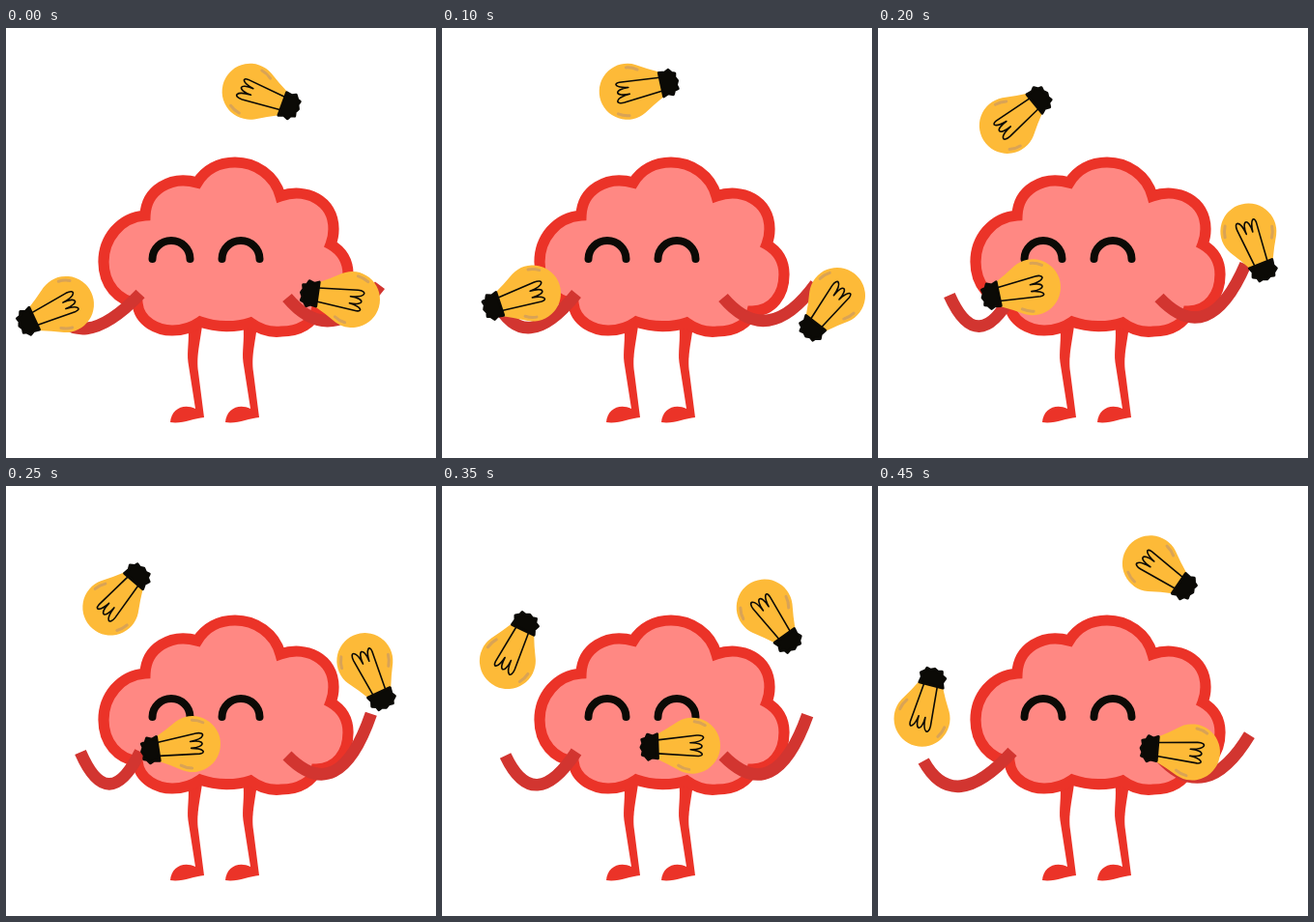
Recreate the animation shown at these times as an HTML page. Size 445 by 445 pixels, loop 0.5 s.

```html
<!DOCTYPE html>
<html lang="en">
<head>
<meta charset="utf-8">
<title>Juggling brain</title>
<style>
  html, body { margin: 0; width: 100%; height: 100%; overflow: hidden; background: #fff; }
  svg { display: block; width: 100vw; height: 100vh; }
  .line { fill: none; stroke: #0b0a06; }
  .arm { fill: none; stroke: #d23530; stroke-width: 12.6; }
</style>
</head>
<body>
<svg viewBox="0 0 445 445">
  <defs>
    <path id="leg" fill="#eb3328" d="M188.5 308H203C200 330 197 340 199 356L205 403C194 404 182 410 170 408C171 394 184 388 196 394L188.5 346C187 334 190 324 188.5 308Z"/>
    <path id="eye" class="line" stroke-width="8" stroke-linecap="round" d="M151.5 239A19.5 19 0 0 1 190.5 239"/>
    <g id="bulb">
      <path fill="#fdba38" d="M38 -12Q25 -18.5 14 -25.4A29 29 0 1 0 14 25.4Q25 18.5 38 12Z"/>
      <path fill="none" stroke="#d9a356" stroke-width="3" stroke-linecap="round" d="M-14 20.5A25 25 0 0 0 -3 24.8M4 -24.6A25 25 0 0 1 15 -20"/>
      <path class="line" stroke-width="1.6" stroke-linejoin="round" d="M36 -7L-6 -11C-13 -11 -11 -6 2 -4C-14 -5 -14 3 2 3C-15 4 -15 11 -5 10.5L36 7"/>
      <path fill="#0b0a06" stroke="#0b0a06" stroke-width="3" stroke-linejoin="round" d="M36 -12L42 -11L46 -13L49 -9L52 -8L51 -4L53 0L51 4L52 8L48 9L46 13L41 11L36 13Z"/>
    </g>
  </defs>
  <use href="#leg"/>
  <use href="#leg" x="57"/>
  <path fill="#ff8883" stroke="#eb3328" stroke-width="11.2" d="M144 194C118 196 101 218 101 242C101 266 116 282 136 285C138 305 158 313 172 313C184 313 194 309 201 304C218 310 238 310 253 305C264 313 276 315 285 314C304 314 318 305 321 293C342 293 354 276 354 255C354 241 348 231 336 224C338 219 339 214 339 208C339 178 310 165 284 174C278 152 258 139 237 139C220 139 206 147 198 160C170 152 145 168 144 194Z"/>
  <use href="#eye"/>
  <use href="#eye" x="72"/>
  <path id="leftArm" class="arm"/>
  <path id="rightArm" class="arm"/>
  <use class="bulb" href="#bulb"/>
  <use class="bulb" href="#bulb"/>
  <use class="bulb" href="#bulb"/>
</svg>
<script>
  const STEP = 50, STEPS = 10;
  const leftArm = document.getElementById('leftArm');
  const rightArm = document.getElementById('rightArm');
  const bulbs = document.querySelectorAll('.bulb');

  // Pose [x, y, angle] of a bulb, u = tenths of a second since the left hand caught it.
  function bulbPose(u) {
    if (u < 5) { // passed across the body
      return [62 + 32 * u + 34 * Math.max(0, u - 1), 267 + 2.6 * (u - 2.7) ** 2, 155 + 6.6 * u];
    }
    if (u < 7) { // swung upwards by the right hand
      const v = u - 5;
      return [358 + 89 * v - 38 * v * v, 281 + 27.5 * v - 31.5 * v * v, 188 - 60.5 * v];
    }
    const d = u - 10.5; // thrown overhead, highest at d = 0
    return [
      217 - 175 * Math.sin(0.35 * d - 0.03),
      65 * Math.hypot(1.5, d) - 37,
      4 - 0.4 * d * d - 66 * Math.atan(d / 2)
    ];
  }

  function draw(step) {
    const wave = shift => Math.cos(2 * Math.PI * (step - shift) / STEPS);

    const lx = 60.5 - 16.5 * wave(0), ly = 280.5 + 5 * wave(0);
    leftArm.setAttribute('d', `M139 275Q${35 + 0.92 * lx} 341.5 ${lx} ${ly}`);

    const lift = 18 + 18 * wave(0.9);
    rightArm.setAttribute('d',
      `M291 279Q${345 - 0.25 * lift} 333 ${377 + 0.3 * lift} ${233 + lift}`);

    bulbs.forEach((bulb, i) => {
      const [x, y, angle] = bulbPose((step + i * STEPS) / 2);
      bulb.setAttribute('transform', `translate(${x} ${y}) rotate(${angle})`);
    });
  }

  const start = performance.now();
  function tick() {
    draw(Math.floor((performance.now() - start) / STEP) % STEPS);
    requestAnimationFrame(tick);
  }
  tick();
</script>
</body>
</html>
```
